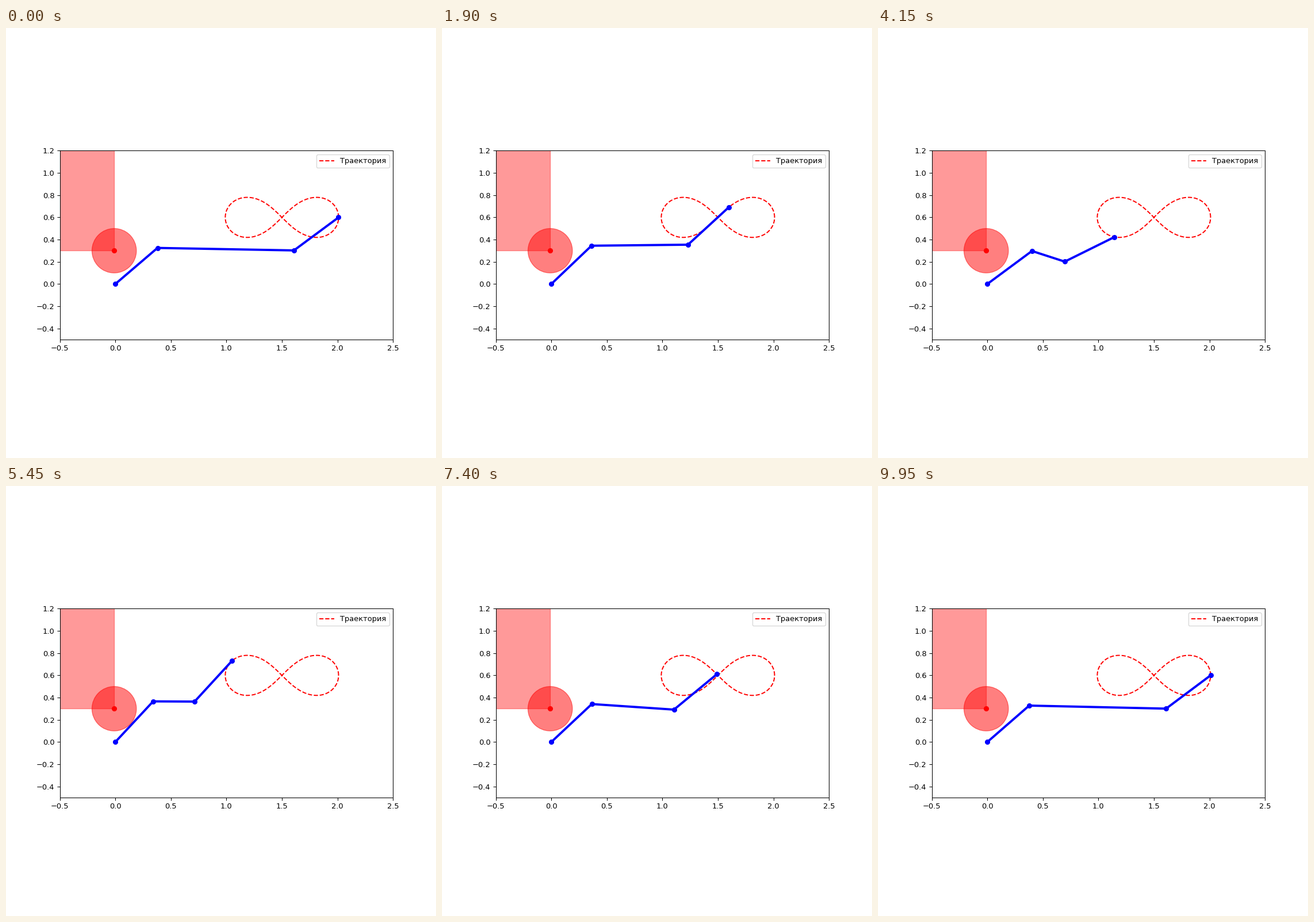
Recreate the animation shown at these times as a matplotlib script. Size 748 by 748 pixels, loop 10 s.

```python
import numpy as np
import matplotlib.pyplot as plt
from matplotlib.animation import FuncAnimation
from matplotlib.patches import Circle, Rectangle

FRAMES = 200
LINK = 0.5            # length of the first and last links
SIZE = 0.51           # half-width of the figure eight
CENTER = np.array([1.5, 0.6])
OBSTACLE = (-0.01, 0.3)


def lemniscate(t):
    r = SIZE * np.cos(t) / (1 + np.sin(t) ** 2)
    return np.column_stack([CENTER[0] + r, CENTER[1] + r * np.sin(t)])


def joints(q):
    """Joint positions for pose (angle, angle, extension, angle)."""
    a1, a2, d, a3 = q
    angles = np.cumsum([a1, a2, a3])
    steps = np.array([LINK, d, LINK])[:, None] * np.column_stack(
        [np.cos(angles), np.sin(angles)])
    return np.vstack([[0, 0], np.cumsum(steps, axis=0)])


def jacobian(q):
    p = joints(q)
    arms = p[3] - p[:3]
    turn = np.column_stack([-arms[:, 1], arms[:, 0]])
    slide = np.array([np.cos(q[0] + q[1]), np.sin(q[0] + q[1])])
    return np.column_stack([turn[0], turn[1], slide, turn[2]])


def follow(q, target):
    """Move the tip to the target with the smallest joint change."""
    for _ in range(3):
        q = q + np.linalg.pinv(jacobian(q)) @ (target - joints(q)[3])
    return q


path = lemniscate(np.linspace(0, 2 * np.pi, FRAMES))

pose = np.array([np.radians(40.55), np.radians(-41.6), 1.2282, np.radians(37.55)])
poses = [joints(pose)]
for target in path[1:]:
    pose = follow(pose, target)
    poses.append(joints(pose))

fig, ax = plt.subplots(figsize=(8, 8), dpi=93.5)
ax.set_xlim(-0.5, 2.5)
ax.set_ylim(-0.5, 1.2)
ax.set_aspect("equal")

ax.add_patch(Rectangle((-1.01, 0.3), 1, 1.5, color="red", alpha=0.4))
ax.add_patch(Circle(OBSTACLE, 0.2, color="red", alpha=0.5))
ax.plot(*OBSTACLE, "ro")
ax.plot(path[:, 0], path[:, 1], "r--", label="Траектория")
arm, = ax.plot([], [], "bo-", lw=3)
ax.legend(loc="upper right")


def update(i):
    arm.set_data(poses[i][:, 0], poses[i][:, 1])
    return arm,


anim = FuncAnimation(fig, update, frames=FRAMES, interval=50,
                     repeat=True, repeat_delay=0)
plt.show()
```
